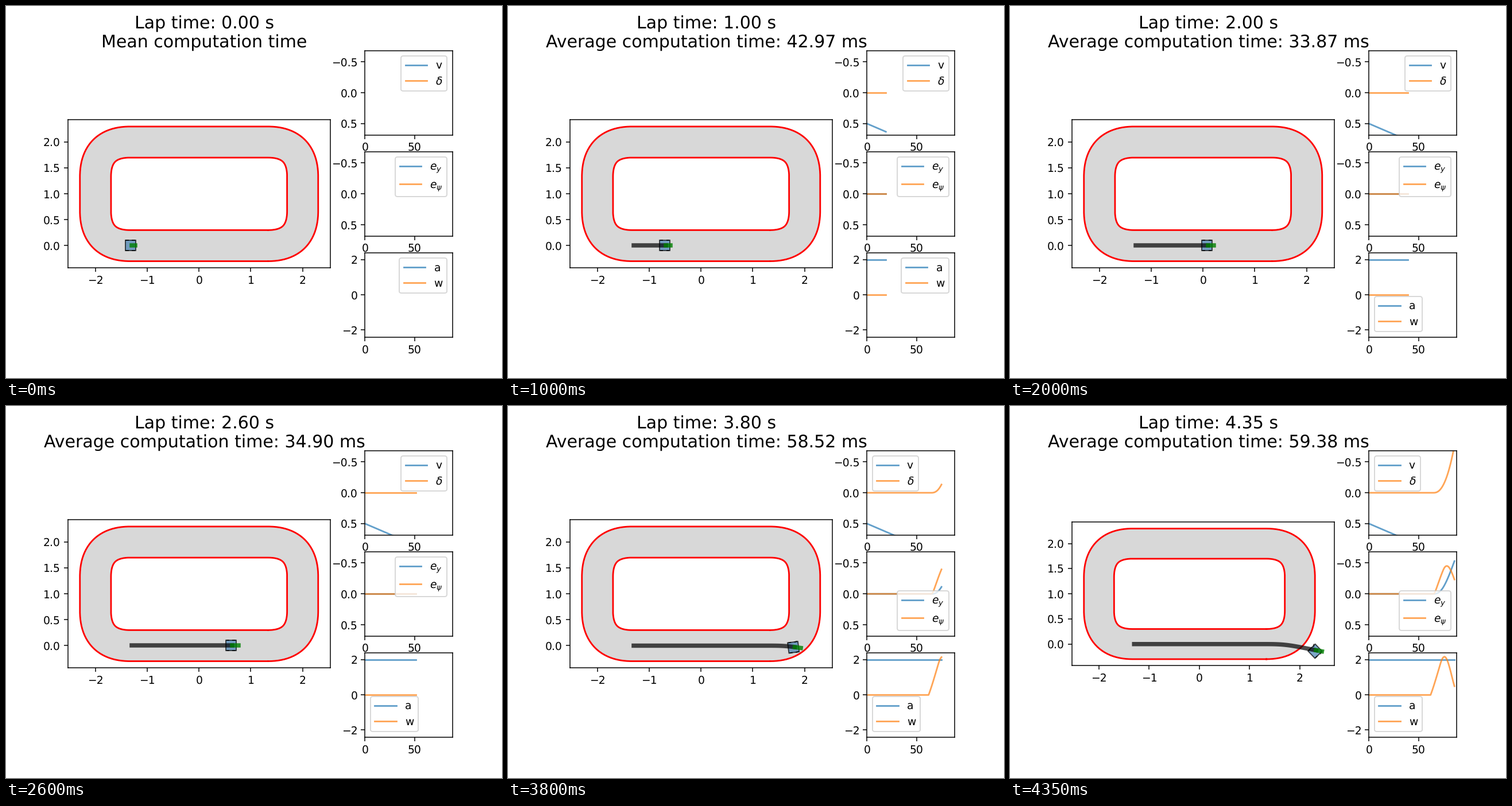
Animation, 864 px wide and 648 px high, one loop 4400 ms. Source, as a matplotlib script:

```python
import numpy as np
import matplotlib.pyplot as plt
from matplotlib.animation import FuncAnimation
from matplotlib.patches import Polygon

plt.rcParams["text.hinting"] = "none"

STEPS, DT = 88, 0.05
TURN = 3.15           # moment the car reaches the bend
HORIZON = 0.125       # look-ahead of the predicted path, s
SIZE = 0.2            # body side length
HALF_WIDTH = 0.3      # of the lane


def hermite(n, knots):
    """Piecewise cubic through (n, value, slope) knots, constant outside."""
    out = np.full(n.shape, float(knots[0][1]))
    for (a, va, sa), (b, vb, sb) in zip(knots, knots[1:]):
        h, m = b - a, n >= a
        u = np.clip((n[m] - a) / h, 0, 1)
        out[m] = (va * (2*u**3 - 3*u**2 + 1) + h * sa * (u**3 - 2*u**2 + u)
                  + vb * (3*u**2 - 2*u**3) + h * sb * (u**3 - u**2))
    return out


def position(t):
    t = np.asarray(t, float)
    s, d = np.minimum(t, TURN), np.maximum(t - TURN, 0)
    x = (-1.3 + 0.5475 * s + 0.0767 * s**2
         + 0.93 * d + 0.02 * (1 - np.exp(-d / 0.18)))
    # integral of a smoothed step in the lateral speed
    span = 0.94
    u = np.clip((t - 3.2) / span, 0, 1)
    drift = span * u**4 * (2.5 - 3*u + u**2) + np.maximum(t - 3.2 - span, 0)
    return x, -0.18 * drift


def boundary(offset, pull=0.66):
    """Closed curve at a distance from a centre line with Bezier bends."""
    t = np.linspace(0, 1, 50)
    b1, b2, b3 = 3*t*(1-t)**2, 3*t**2*(1-t), t**3
    bend = 2 / 3 * np.array([pull*b1 + b2 + b3, (1 - pull)*b2 + b3])
    slope = np.gradient(bend, axis=1, edge_order=2)
    slope /= np.hypot(*slope)
    x = 4/3 + bend[0] + offset * slope[1]
    y = -1 + bend[1] - offset * slope[0]
    # mirror the lower right bend into the other three corners
    xs = np.concatenate([x, x[::-1], -x, -x[::-1], x[:1]])
    ys = np.concatenate([y, -y[::-1], -y, y[::-1], y[:1]])
    return xs, ys + 1


def box(center, w, h, angle):
    c, s = np.cos(angle), np.sin(angle)
    pts = np.array([[-w, -h], [w, -h], [w, h], [-w, h]]) / 2
    return pts @ np.array([[c, s], [-s, c]]) + center


n = np.arange(STEPS)
speed = 0.5 + 0.0069 * n
delta = -0.68 * (np.maximum(n - 65, 0) / 20) ** 2.35
e_y = -hermite(n, [(66, 0, 0), (75, 0.113, 0.027), (86, 0.53, 0.044)])
e_psi = -hermite(n, [(65, 0, 0), (67, 0.05, 0.043), (75, 0.396, 0.037),
                     (78.4, 0.452, 0), (86, 0.233, -0.045)])
accel = np.full(STEPS, 2.0)
omega = hermite(n, [(62, 0, 0.15), (72, 1.8, 0.19), (76, 2.18, 0),
                    (86, 0.5, -0.2)])
px, py = position(n * DT)

# solver time: running mean from the accumulated total
marks = [1, 20, 40, 52, 63, 76, 87]
means = [385, 42.97, 33.87, 34.90, 31.79, 58.52, 59.38]
total = np.interp(n, marks, np.multiply(marks, means))

fig = plt.figure(figsize=(6.4, 4.8), dpi=135)
grid = fig.add_gridspec(3, 2, width_ratios=[3, 1])
title = fig.text(0.4, 0.974, "", fontsize=16, ha="center", va="top")

ax = fig.add_subplot(grid[:, 0])
ax.set_aspect("equal")
outer, inner = boundary(HALF_WIDTH), boundary(-HALF_WIDTH)
ax.fill(*outer, color="gray", alpha=0.3, lw=0)
ax.fill(*inner, color="white", lw=0)
for edge in (outer, inner):
    ax.plot(*edge, color="red")
ax.set_ylim(-0.43, 2.43)

body = ax.add_patch(Polygon(np.zeros((4, 2)), fc="steelblue", ec="black",
                            lw=1, alpha=0.7))
wheels = [ax.add_patch(Polygon(np.zeros((4, 2)), color="black", alpha=0.7,
                               lw=0)) for _ in range(4)]
trail, = ax.plot([], [], color="black", lw=4, alpha=0.7)
ahead, = ax.plot([], [], color="green", lw=4, alpha=0.8)

curves = []


def panel(row, ylim, *series):
    a = fig.add_subplot(grid[row, 1])
    for label, data in series:
        line, = a.plot([], [], alpha=0.7, label=label)
        curves.append((line, data))
    a.set_xlim(0, STEPS)
    a.set_ylim(*ylim)
    a.legend(loc="best")


panel(0, (0.682, -0.682), ("v", speed), (r"$\delta$", delta))
panel(1, (0.682, -0.682), (r"$e_y$", e_y), (r"$e_\psi$", e_psi))
panel(2, (-2.4, 2.4), ("a", accel), ("w", omega))


def update(k):
    t = k * DT
    second = (f"Average computation time: {total[k] / k:.2f} ms" if k
              else "Mean computation time")
    title.set_text(f"Lap time: {t:.2f} s\n{second}")

    for line, data in curves:
        line.set_data(n[:k], data[:k])

    ref = np.array([px[k], py[k]])
    vel = (np.array(position(t + 1e-3)) - ref) / 1e-3
    tip = ref + HORIZON * vel
    trail.set_data(px[:k + 1], py[:k + 1])
    ahead.set_data([ref[0], tip[0]], [ref[1], tip[1]])

    steer = -delta[max(k - 1, 0)]
    along = np.array([np.cos(steer), np.sin(steer)])
    side = np.array([-along[1], along[0]])
    center = ref - 0.027 * along
    shape = box(center, SIZE, SIZE, steer)
    body.set_xy(shape)
    for i, wheel in enumerate(wheels):
        front, left = i // 2, 2 * (i % 2) - 1
        hub = center + (2 * front - 1) * 0.06 * along + left * SIZE / 2 * side
        wheel.set_xy(box(hub, 0.06, 0.022, steer * (1 + front)))

    right = max(2.3, shape[:, 0].max(), tip[0])
    pad = 0.05 * (right + 2.3)
    ax.set_xlim(-2.3 - pad, right + pad)
    return []


anim = FuncAnimation(fig, update, frames=STEPS, interval=50, repeat=True,
                     repeat_delay=0, blit=False)
plt.show()
```
